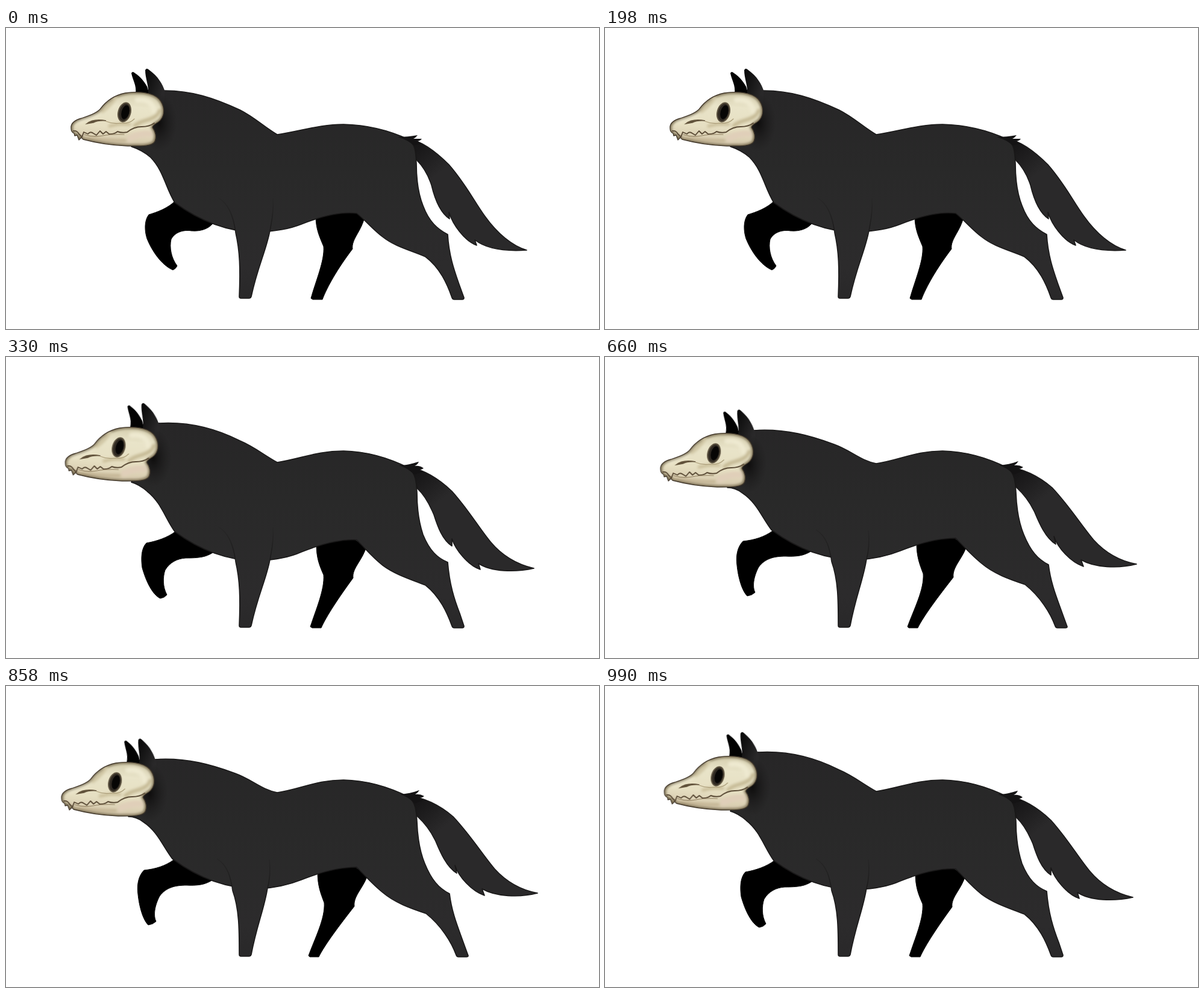
Write an HTML page without scripts that moves like this. It is 984x500 px and loops after 1320 ms.

```html
<!DOCTYPE html>
<html lang="en">
<head>
<meta charset="utf-8">
<title>Walking beast</title>
<style>
html, body { margin: 0; width: 100%; height: 100%; overflow: hidden; background: #fff; }
svg { display: block; width: 984px; height: 500px; }

.pose { animation: 1.32s step-end infinite; }
.coat { stroke: #191818; stroke-width: 1.6; stroke-linejoin: round; }
.far { fill: #000; stroke: #0a0a0a; stroke-width: 1; stroke-linejoin: round; }

#torso {
  animation-name: torso;
  d: path("M250,104 L264,104 C308,104 345,116 388,136 C412,148 428,164 450,177 C490,171 520,160 560,160 C605,161 640,172 668,185 C680,193 680,210 681,225 C681,255 686,280 692,295 C702,322 716,334 733,343 C735,378 744,403 752,426 L760,448 Q760,451 757,451 L744,451 Q741,451 740,448 C732,425 720,398 696,380 C670,369 645,363 625,347 C608,334 597,320 582,308 C550,304 515,316 490,326 C470,334 450,337 420,339 C370,340 320,320 280,290 C264,264 262,238 240,215 C230,206 220,201 208,197 L225,150 Z");
}
@keyframes torso {
  25%, 75% { d: path("M240,111 L253,110 C300,107 345,117 388,139 C412,149 428,163 450,175 C490,169 515,156 560,156 C605,157 640,170 668,184 C680,193 681,210 682,225 C682,255 687,280 692,295 C703,322 716,334 733,341 C736,378 744,403 753,426 L760,447 Q760,450 757,450 L744,450 Q741,450 740,447 C732,425 720,398 696,379 C670,369 645,361 625,346 C608,333 597,319 582,304 C550,302 515,314 490,324 C470,333 450,337 420,338 C370,340 320,320 280,290 C264,268 258,242 234,223 C226,216 218,211 208,208 L225,160 Z"); }
  50% { d: path("M234,122 L246,122 C300,118 345,132 380,145 C408,155 424,172 450,177 C490,171 515,156 560,156 C605,157 640,170 668,184 C680,193 681,210 682,225 C683,255 688,278 695,295 C706,322 718,336 736,345 C740,378 751,403 759,426 L767,448 Q767,450 764,450 L751,450 Q748,450 747,447 C739,425 722,398 697,378 C670,369 645,360 625,343 C608,329 597,317 582,301 C550,301 515,312 490,322 C470,330 450,335 420,337 C365,337 316,317 276,287 C260,266 252,242 228,226 C220,220 212,217 203,217 L220,170 Z"); }
}

#fore {
  animation-name: fore;
  d: path("M443,283 C445,305 440,325 438,337 C431,372 418,395 407,446 Q406,449 403,449 L390,449 Q387,449 387,446 C389,400 388,370 381,340 C378,315 370,292 352,282");
}
@keyframes fore {
  50% { d: path("M437,288 C439,308 437,325 434,336 C428,372 416,398 407,446 Q406,449 403,449 L390,449 Q387,449 387,446 C387,405 387,370 376,340 C373,318 368,298 350,287"); }
}

#lift {
  animation-name: lift;
  d: path("M281,287 C268,300 250,306 237,310 C229,320 230,338 234,350 C242,370 258,394 277,402 Q282,400 284,395 C274,382 271,364 274,351 C281,338 296,335 308,337 C325,338 336,333 343,325 Z");
}
@keyframes lift {
  25%, 75% { d: path("M281,290 C268,300 250,306 233,309 C224,318 224,336 226,350 C232,372 243,395 256,401 Q263,400 267,395 C260,382 260,366 264,354 C272,341 284,335 298,334 C322,334 332,332 343,325 Z"); }
  50% { d: path("M278,289 C264,299 248,304 229,306 C219,316 217,332 219,346 C221,366 227,388 236,397 Q244,396 249,391 C243,379 249,360 255,349 C266,334 282,331 300,331 C322,332 332,329 343,322 Z"); }
}

#hind {
  animation-name: hind;
  d: path("M514,312 C514,334 520,346 527,363 C529,386 514,420 506,449 L509,451 L525,451 C533,430 550,400 575,367 C573,352 588,339 594,318 L578,304 Z");
}
@keyframes hind {
  25%, 75% { d: path("M515,310 C515,334 520,346 527,362 C529,386 514,420 505,448 L508,450 L523,450 C532,430 552,400 576,367 C574,352 590,339 597,318 L578,302 Z"); }
  50% { d: path("M517,308 C517,332 522,344 528,360 C530,386 512,420 502,448 L504,450 L519,450 C529,430 553,398 578,366 C576,350 592,336 599,317 L578,299 Z"); }
}

#tail {
  animation-name: tail;
  d: path("M668,184 C690,188 714,206 735,227 C763,259 778,290 795,313 C815,341 840,362 864,369 C833,371 798,368 778,352 L781,361 C760,353 741,326 735,306 L736,317 C719,306 711,282 706,261 C700,243 692,230 682,220 C679,208 676,197 668,184 Z");
}
@keyframes tail {
  25%, 75% { d: path("M668,183 C692,186 718,202 740,223 C767,253 785,284 804,307 C824,331 850,345 876,351 C845,358 805,357 784,343 L787,353 C767,346 746,321 740,302 L740,314 C724,304 716,281 710,262 C702,243 694,229 683,219 C680,208 676,197 668,183 Z"); }
  50% { d: path("M668,183 C692,184 720,198 742,217 C771,248 790,279 811,304 C831,326 855,339 882,344 C852,352 812,350 790,337 L794,348 C773,341 751,317 745,298 L748,311 C731,301 720,275 713,258 C705,241 695,228 683,217 C680,208 676,197 668,183 Z"); }
}

#tuft {
  animation-name: tuft;
  d: path("M650,181 C662,181 672,180 683,178 Q680,182 676,184 L690,184 Q687,188 682,188 L691,192 L676,195 C669,188 660,184 650,181 Z");
}
@keyframes tuft {
  25%, 75% { d: path("M652,180 C664,180 674,177 685,174 Q683,179 678,181 Q687,180 693,185 Q688,188 683,187 L693,191 L677,195 C670,188 662,183 652,180 Z"); }
  50% { d: path("M654,180 C665,179 675,177 686,173 Q683,178 679,180 Q687,179 694,183 Q689,187 684,186 L693,190 L678,195 C671,188 664,183 654,180 Z"); }
}

#skull { animation-name: skull; }
@keyframes skull {
  25%, 75% { transform: translate(-9.5px, 10px); }
  50% { transform: translate(-15.8px, 20px); }
}
#ears { animation-name: ears; transform-origin: 250px 110px; }
@keyframes ears {
  25%, 75% { transform: translate(-9px, 10px) rotate(4deg); }
  50% { transform: translate(-15px, 21px) rotate(5deg); }
}
</style>
</head>
<body>
<svg viewBox="0 0 984 500">
  <defs>
    <linearGradient id="fur" gradientUnits="userSpaceOnUse" x1="0" y1="100" x2="0" y2="450">
      <stop offset="0" stop-color="#272627"/>
      <stop offset=".4" stop-color="#292929"/>
      <stop offset=".85" stop-color="#2c2b2c"/>
      <stop offset="1" stop-color="#292829"/>
    </linearGradient>
    <linearGradient id="edge" gradientUnits="userSpaceOnUse" x1="0" y1="275" x2="0" y2="345">
      <stop offset="0" stop-color="#191818" stop-opacity="0"/>
      <stop offset="1" stop-color="#191818"/>
    </linearGradient>
    <linearGradient id="brush" gradientUnits="userSpaceOnUse" x1="678" y1="190" x2="720" y2="240">
      <stop offset="0" stop-color="#151415"/>
      <stop offset="1" stop-color="#2a292a"/>
    </linearGradient>
    <linearGradient id="ear" gradientUnits="userSpaceOnUse" x1="230" y1="90" x2="262" y2="100">
      <stop offset="0" stop-color="#0c0c0c"/>
      <stop offset="1" stop-color="#292829"/>
    </linearGradient>
    <linearGradient id="bone" gradientUnits="userSpaceOnUse" x1="180" y1="106" x2="172" y2="196">
      <stop offset="0" stop-color="#d6cfb0"/>
      <stop offset=".25" stop-color="#e9e4c9"/>
      <stop offset=".65" stop-color="#e6dfc2"/>
      <stop offset="1" stop-color="#d2c4a8"/>
    </linearGradient>
    <radialGradient id="dusk">
      <stop offset="0" stop-color="#0b0a0a" stop-opacity=".9"/>
      <stop offset="1" stop-color="#1a1919" stop-opacity="0"/>
    </radialGradient>
    <filter id="soft" x="-30%" y="-30%" width="160%" height="160%"><feGaussianBlur stdDeviation="2"/></filter>
    <path id="face" d="M108,167 C107,158 114,153 125,150 C137,146 149,142 156,135 C164,124 178,112 198,108 C218,105 242,106 254,118 C263,128 264,143 257,152 C253,158 244,159 243,165 C248,172 250,181 247,188 C243,197 222,196 202,196 C178,195 150,191 128,185 L125,182 L121,186 L118,178 L114,179 L113,175 Q108,173 108,167 Z"/>
    <clipPath id="mask"><use href="#face"/></clipPath>
  </defs>

  <path id="lift" class="pose far"/>
  <path id="hind" class="pose far"/>
  <path id="tail" class="pose coat" fill="url(#brush)"/>
  <path id="torso" class="pose coat" fill="url(#fur)"/>
  <path id="fore" class="pose" fill="url(#fur)" stroke="url(#edge)" stroke-width="1.6"/>
  <path id="tuft" class="pose" fill="#141314"/>

  <g id="ears" class="pose">
    <path d="M208,75 Q210,71 214,75 C222,80 229,88 234,97 L238,110 L215,109 C217,95 210,86 208,75 Z" fill="#030303"/>
    <path d="M231,70 Q233,65 238,70 C252,80 260,93 264,106 L262,126 L236,110 C237,95 231,84 231,70 Z" fill="url(#ear)"/>
  </g>

  <g id="skull" class="pose">
    <ellipse cx="254" cy="157" rx="29" ry="47" fill="url(#dusk)"/>
    <use href="#face" fill="url(#bone)"/>
    <g clip-path="url(#mask)" fill="none" stroke-linecap="round">
      <g filter="url(#soft)">
        <use href="#face" stroke="#71654a" stroke-width="5"/>
        <path d="M214,162 C228,150 247,156 255,137" stroke="#c5b994" stroke-width="6"/>
        <path d="M172,163 Q190,158 205,160" stroke="#c9bd99" stroke-width="5"/>
        <path d="M160,138 Q174,128 181,116" stroke="#cfc5a3" stroke-width="6"/>
        <path d="M206,183 Q224,174 238,176" stroke="#e0cfb9" stroke-width="11"/>
        <path d="M130,182 Q166,187 198,187" stroke="#c0b08f" stroke-width="4"/>
        <path d="M218,120 Q242,117 246,138" stroke="#eee9d0" stroke-width="9"/>
        <path d="M122,157 Q136,151 152,146" stroke="#eee8cf" stroke-width="4"/>
      </g>
      <path d="M112,171 Q118,170 121,176 L126,181 L129,173 L136,176 Q140,171 145,175 L150,178 L156,171 L161,176 L166,172 L171,176 Q179,177 185,172 Q193,175 201,173 Q212,164 225,164 Q238,164 246,158" stroke="#5a4b36" stroke-width="1.9" stroke-linejoin="round"/>
      <path d="M130,177 Q145,182 160,179 T196,177" stroke="#8d7c5d" stroke-width="1.2"/>
      <path d="M134,159 Q145,150 166,154 Q153,153 145,157 Z" fill="#5a4c37" stroke="#66573f" stroke-width="1.6"/>
      <path d="M166,155 Q178,160 190,158 Q204,160 213,151" stroke="#aa9c78" stroke-width="1.2"/>
    </g>
    <use href="#face" fill="none" stroke="#42382b" stroke-width="1.3" stroke-linejoin="round"/>
    <g transform="translate(196.5 140) rotate(15)">
      <ellipse rx="11" ry="17" fill="#5a503e"/>
      <ellipse rx="8.8" ry="14.8" fill="#2f2922"/>
      <ellipse cx="1.4" cy="-.5" rx="6.3" ry="11.8" fill="#070605"/>
    </g>
  </g>
</svg>
</body>
</html>
```
